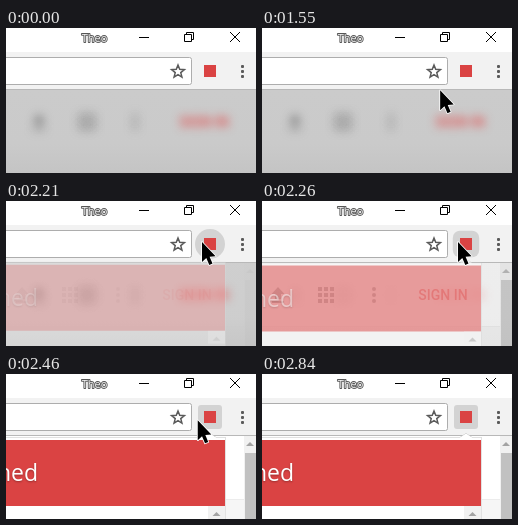
These frames come from a looping animation (250x145 px, 4040 ms). An HTML page with a canvas:

```html
<!DOCTYPE html>
<html lang="en">
<head>
<meta charset="utf-8">
<title>Pinned extension</title>
<style>
  html, body { margin: 0; width: 100%; height: 100%; overflow: hidden; background: #fff; }
  canvas { display: block; width: 250px; height: 145px; }
</style>
</head>
<body>
<canvas id="stage" width="250" height="145"></canvas>
<script>
const LOOP = 4040;
const RED = '#da4343';
const ctx = document.getElementById('stage').getContext('2d');

const clamp = v => Math.max(0, Math.min(1, v));
const span = (t, from, to) => clamp((t - from) / (to - from));
const mix = (a, b, p) => a + (b - a) * p;
const easeOut = p => 1 - (1 - p) ** 2;
const easeInOut = p => p * p * (3 - 2 * p);

function rect(x, y, w, h, color) {
  ctx.fillStyle = color;
  ctx.fillRect(x, y, w, h);
}

function trace(points, closed = true) {
  ctx.beginPath();
  points.forEach(([x, y]) => ctx.lineTo(x, y));
  if (closed) ctx.closePath();
}

function polygon(points, color) {
  trace(points);
  ctx.fillStyle = color;
  ctx.fill();
}

function roundBox(x, y, w, h, r, fill, stroke) {
  ctx.beginPath();
  ctx.roundRect(x, y, w, h, r);
  if (fill) { ctx.fillStyle = fill; ctx.fill(); }
  if (stroke) { ctx.strokeStyle = stroke; ctx.lineWidth = 1; ctx.stroke(); }
}

function layer(draw) {
  ctx.save();
  draw();
  ctx.restore();
}

function write(text, x, y, font, color, align = 'left') {
  ctx.font = font;
  ctx.textAlign = align;
  ctx.fillStyle = color;
  ctx.fillText(text, x, y);
}

function scrollTop(x, y, w) {
  const mid = x + w / 2;
  rect(x, y, w, 145 - y, '#f1f1f1');
  polygon([[mid - 4, y + 10], [mid, y + 6], [mid + 4, y + 10]], '#a3a3a3');
}

// Header icons; dx is the room taken by the page scrollbar.
function headerIcons(dx) {
  const gray = '#757575';
  layer(() => {
    ctx.translate(dx, 0);
    polygon([[33, 86], [39.5, 93], [36, 93], [36, 98], [30, 98], [30, 93], [26.5, 93]], gray);
    rect(27, 100, 12, 2, gray);
    for (let i = 0; i < 9; i++)
      rect(73 + i % 3 * 6, 86 + Math.floor(i / 3) * 6, 4, 4, gray);
    for (let i = 0; i < 3; i++) {
      ctx.beginPath();
      ctx.arc(129, 88 + i * 6, 2, 0, 7);
      ctx.fill();
    }
    write('SIGN IN', 198, 99, '500 14px Roboto, sans-serif', '#e62f2f', 'center');
  });
}

function page(dx) {
  rect(0, 62, 250, 63, '#fff');
  rect(0, 125, 250, 20, '#f6f6f6');
  rect(0, 125, 250, 1, '#ececec');
  headerIcons(dx);
}

function dimmedPage(alpha) {
  if (!alpha) return;
  layer(() => {
    ctx.globalAlpha = alpha;
    const shade = ctx.createLinearGradient(0, 62, 0, 145);
    shade.addColorStop(0, '#cbcbcb');
    shade.addColorStop(0.65, '#cacaca');
    shade.addColorStop(1, '#c4c4c4');
    rect(0, 62, 250, 83, shade);
    ctx.globalAlpha = alpha * 0.8;
    ctx.filter = 'blur(5px)';
    headerIcons(0);
  });
}

function ripple(t) {
  if (t < 2050) return;
  const grow = easeOut(span(t, 2040, 2180));
  const square = span(t, 2210, 2295);
  const half = mix(15 * grow, 12, square);
  roundBox(204 - half, 43 - half, half * 2, half * 2, mix(half, 3, square), '#d3d3d3');
}

function chrome(t) {
  rect(0, 0, 250, 25, '#fff');
  rect(0, 24, 250, 38, '#f2f2f2');
  rect(0, 61, 250, 1, '#b8b8b8');

  ctx.font = '11px "Open Sans", sans-serif';
  ctx.textAlign = 'center';
  ctx.lineJoin = 'round';
  ctx.strokeStyle = '#555';
  ctx.lineWidth = 1.8;
  ctx.strokeText('Theo', 88.5, 14);
  write('Theo', 88.5, 14, ctx.font, '#f4f4f4', 'center');

  rect(133, 9, 10, 1, '#000');
  ctx.strokeStyle = '#000';
  ctx.lineWidth = 1;
  ctx.strokeRect(178.5, 6.5, 7, 7);
  trace([[180.5, 6], [180.5, 4.5], [187.5, 4.5], [187.5, 11.5], [186, 11.5]], false);
  ctx.stroke();
  for (const d of [-5, 5]) {
    trace([[229 - d, 4], [229 + d, 14]], false);
    ctx.stroke();
  }

  roundBox(-5, 29.5, 190.5, 27, 2, '#fff', '#adadad');
  const star = Array.from({ length: 10 }, (_, i) => {
    const r = i % 2 ? 2.9 : 6.7, a = i * Math.PI / 5;
    return [172 + r * Math.sin(a), 43.7 - r * Math.cos(a)];
  });
  trace(star);
  ctx.lineJoin = 'miter';
  ctx.strokeStyle = '#5a5a5a';
  ctx.lineWidth = 1.5;
  ctx.stroke();

  ripple(t);
  rect(198, 37, 12, 12, RED);
  for (let i = 0; i < 3; i++) roundBox(235, 37 + i * 5, 3, 3, 1, '#5a5a5a');
}

function popup(t) {
  const alpha = span(t, 2159, 2363);
  if (!alpha) return;
  layer(() => {
    ctx.globalAlpha = alpha;
    ctx.translate(0, -3 * (1 - alpha));
    trace([[-2, 63.5], [198, 63.5], [204, 59.5], [210, 63.5], [219.5, 63.5], [219.5, 150], [-2, 150]]);
    ctx.strokeStyle = '#c4c4c4';
    ctx.lineWidth = 1;
    ctx.stroke();
    ctx.fillStyle = '#fff';
    ctx.fill();
    rect(0, 66, 219, 66, RED);
    scrollTop(202, 132, 17);
    ctx.shadowColor = 'rgba(0,0,0,.3)';
    ctx.shadowBlur = 2;
    ctx.shadowOffsetY = 1;
    write('ned', 32, 107, '23px "Open Sans", sans-serif', '#fff', 'right');
  });
}

function cursorAt(t) {
  if (t < 1710) {
    const p = easeOut(span(t, 1200, 1710));
    return [mix(96, 187, p), mix(139, 54, p)];
  }
  if (t < 2380) {
    const p = easeInOut(span(t, 1710, 1910));
    return [mix(187, 196, p), mix(54, 41, p)];
  }
  const s = (t - 2380) / 80;
  return [196 - 4.2 * s ** 1.22, 41 + 5.2 * s ** 1.8];
}

function cursor(t) {
  if (t < 1200 || t >= 2840) return;
  layer(() => {
    ctx.translate(...cursorAt(t));
    trace([[0, 0], [0, 20], [4.3, 16], [7.3, 23], [10.5, 21.6], [7.6, 14.8], [13.6, 14.3]]);
    ctx.strokeStyle = '#fff';
    ctx.lineWidth = 1.6;
    ctx.lineJoin = 'round';
    ctx.stroke();
    ctx.fillStyle = '#000';
    ctx.fill();
  });
}

function draw() {
  const t = performance.now() % LOOP;
  page(-17);
  scrollTop(238, 62, 12);
  // The visible part of the wide scrollbar ends at the stage edge.
  rect(239, 79, 11, 66, '#c1c1c1');
  dimmedPage(1 - span(t, 2205, 2290));
  chrome(t);
  popup(t);
  cursor(t);
  requestAnimationFrame(draw);
}
draw();
</script>
</body>
</html>
```
